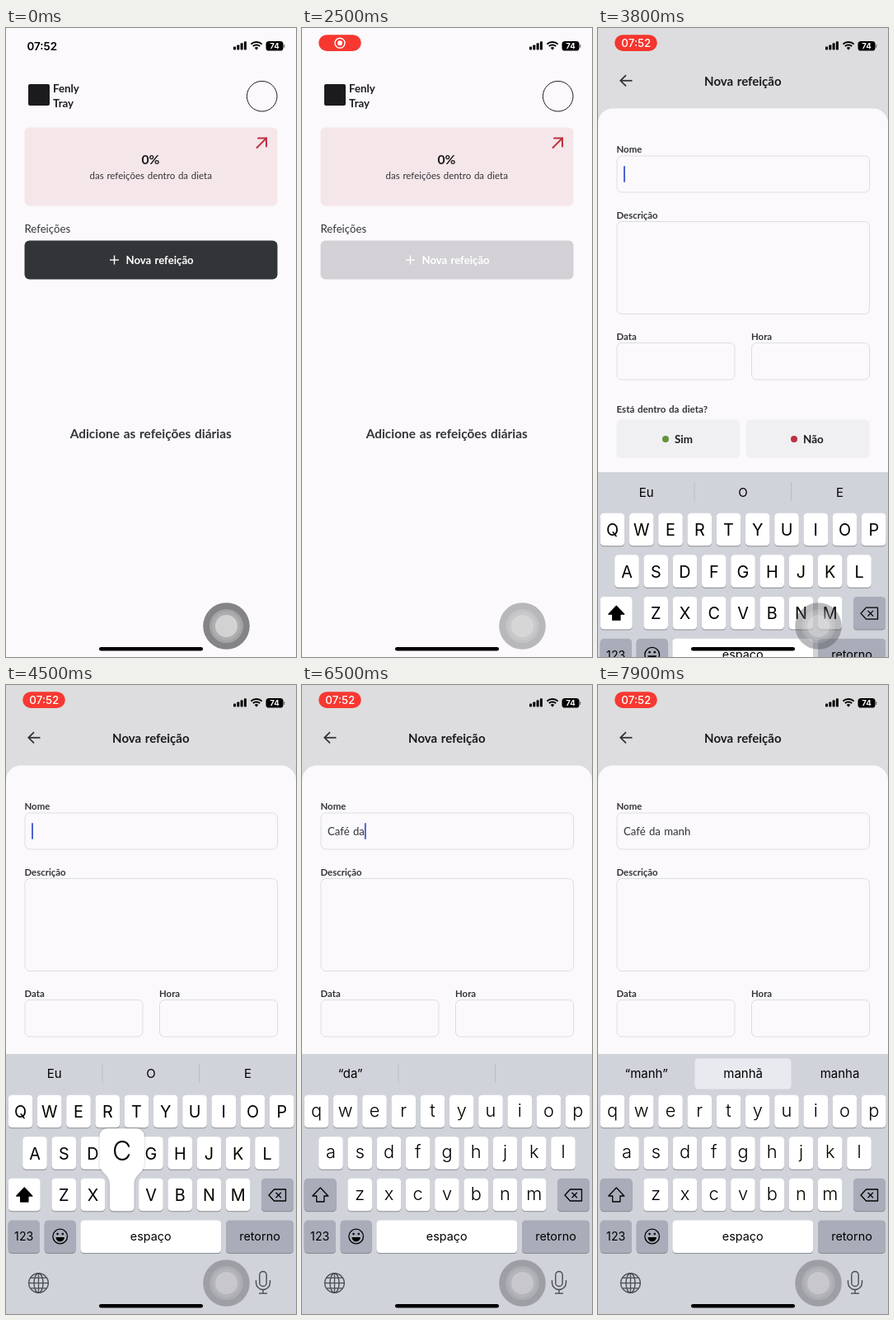
Animation of 352 by 762 pixels, one loop 8 s. Source, as an HTML page with a canvas:

```html
<!DOCTYPE html>
<html lang="pt">
<head>
<meta charset="utf-8">
<title>Nova refeição</title>
<style>
html, body { margin: 0; width: 100%; height: 100%; overflow: hidden; background: #fbf9fc; }
canvas { display: block; width: 352px; height: 762px; }
</style>
</head>
<body>
<canvas id="stage"></canvas>
<script>
const W = 352, H = 762, LOOP = 8000;
const canvas = document.getElementById('stage');
const ctx = canvas.getContext('2d');
const ratio = window.devicePixelRatio || 1;
canvas.width = W * ratio;
canvas.height = H * ratio;

const APP = 'Lato, sans-serif', SYS = 'Inter, sans-serif';
const PAPER = '#fbf9fc', INK = '#1b1b1e', DARK = '#333438', LINE = '#dddddf';
const RED = '#bf3040', GREEN = '#639339', SPECIAL = '#a9adb9';

const clamp = v => Math.max(0, Math.min(1, v));
const ramp = (t, a, b) => clamp((t - a) / (b - a));
// Remaining distance of a critically damped spring, from 1 to 0.
const spring = (t, start, w) => {
  const x = Math.max(0, t - start) / 1000 * w;
  const left = (1 + x) * Math.exp(-x);
  return left > 0.003 ? left : 0;
};

function box(x, y, w, h, r, fill, stroke) {
  ctx.beginPath();
  ctx.roundRect(x, y, w, h, r);
  if (fill) { ctx.fillStyle = fill; ctx.fill(); }
  if (stroke) { ctx.strokeStyle = stroke; ctx.lineWidth = 1; ctx.stroke(); }
}

function disc(x, y, r, fill) {
  ctx.beginPath();
  ctx.arc(x, y, r, 0, Math.PI * 2);
  ctx.fillStyle = fill;
  ctx.fill();
}

function ring(x, y, r, color, width) {
  ctx.beginPath();
  ctx.arc(x, y, r, 0, Math.PI * 2);
  ctx.strokeStyle = color;
  ctx.lineWidth = width;
  ctx.stroke();
}

function poly(points, x = 0, y = 0) {
  ctx.beginPath();
  points.forEach(([px, py]) => ctx.lineTo(x + px, y + py));
}

function lines(color, width, ...paths) {
  ctx.strokeStyle = color;
  ctx.lineWidth = width;
  for (const p of paths) { poly(p); ctx.stroke(); }
}

// y is the middle of the capital letters.
function text(s, x, y, size, { weight = 400, color = INK, align = 'left', font = APP } = {}) {
  ctx.font = `${weight} ${size}px ${font}`;
  ctx.wordSpacing = font === APP ? size * 0.07 + 'px' : '0px';
  ctx.textAlign = align;
  ctx.fillStyle = color;
  ctx.fillText(s, x, y + size * 0.36);
}
const mid = (s, x, y, size, opt) => text(s, x, y, size, { align: 'center', ...opt });
const sys = (s, x, y, size, opt) => mid(s, x, y, size, { font: SYS, color: '#000', ...opt });

/* ---------- typing ---------- */

// time, text in the field, suggestions, pressed key, highlighted suggestion
const STEPS = [
  [3600, '', ['Eu', 'O', 'E']],
  [4600, 'C', ['“C”', 'Com', 'Como'], 'c'],
  [4950, 'Ca', ['“Ca”', 'Cada', 'Casa'], 'a'],
  [5350, 'Caf', ['“Caf”', 'Café', 'Cafés'], 'f'],
  [5650, 'Cafe', ['“Cafe”', 'Café', 'Cafés'], 'e', 1],
  [5950, 'Café ', ['da', 'com', 'de'], ' '],
  [6250, 'Café d', ['“d”', 'de', 'da'], 'd'],
  [6450, 'Café da', ['“da”', '', ''], 'a'],
  [6750, 'Café da ', ['manhã', 'noite', 'tarde'], ' '],
  [7000, 'Café da m', ['“m”', 'me', 'meu'], 'm'],
  [7150, 'Café da ma', ['“ma”', 'mas', 'mais'], 'a'],
  [7300, 'Café da man', ['“man”', 'manhã', 'mandar'], 'n'],
  [7400, 'Café da manh', ['“manh”', 'manhã', 'manha'], 'h', 1]
];

function typing(t) {
  let i = 0;
  while (i + 1 < STEPS.length && t >= STEPS[i + 1][0]) i++;
  const [at, value, words, , best] = STEPS[i];
  const next = STEPS[i + 1];
  const hold = i === 0 ? 200 : 110;
  return {
    value, words, best, upper: i === 0,
    pressed: next && t >= next[0] - hold ? next[3] : null,
    cursor: t >= 3600 && (t - at) % 850 < 500
  };
}

/* ---------- screens ---------- */

function home(t) {
  ctx.fillStyle = PAPER;
  ctx.fillRect(0, 0, W, H);

  box(27, 68, 26, 26, 2, INK);
  text('Fenly', 57, 73, 13.3, { weight: 700 });
  text('Tray', 57, 91, 13.3, { weight: 700 });
  ring(310.7, 82.7, 18.3, INK, 1);

  box(22.5, 120.5, 307, 95, 6, '#f5e6e9');
  ctx.lineCap = 'round';
  lines(RED, 2, [[304.5, 145], [316, 133.5]], [[306, 133.5], [316, 133.5], [316, 143.5]]);
  ctx.lineCap = 'butt';
  mid('0%', 175.5, 159.4, 15.8, { weight: 700 });
  mid('das refeições dentro da dieta', 175.7, 178.5, 11.5, { color: DARK });

  text('Refeições', 22.5, 243.5, 13.2, { color: DARK });
  const press = ramp(t, 2330, 2500) * (1 - ramp(t, 2750, 2950));
  ctx.globalAlpha = 1 - 0.8 * press;
  box(22.5, 257.5, 307, 47, 6, DARK);
  ctx.globalAlpha = 1;
  lines('#fff', 1.4, [[126, 281], [137, 281]], [[131.5, 275.5], [131.5, 286.5]]);
  text('Nova refeição', 145.5, 281, 13.2, { weight: 700, color: '#fff' });

  mid('Adicione as refeições diárias', 175.7, 491.2, 15.4, { weight: 700, color: DARK });
}

function field(label, x, y, w, h) {
  text(label, x - 0.5, y - 8, 11.4, { weight: 700, color: DARK });
  box(x, y, w, h, 6, null, LINE);
}

function option(label, x, dot, color) {
  box(x, 474.5, 150, 46.5, 6, '#f0eff2');
  disc(dot, 498, 4, color);
  text(label, dot + 11, 498, 13.4, { weight: 700 });
}

function form(state) {
  ctx.fillStyle = LINE;
  ctx.fillRect(0, 0, W, 140);
  box(0, 97.5, W, H - 97.5, [18, 18, 0, 0], PAPER);
  lines(DARK, 1.8, [[41.5, 63.8], [27.5, 63.8]], [[34, 57.2], [27.3, 63.8], [34, 70.4]]);
  mid('Nova refeição', 175.8, 64.5, 15, { weight: 700 });

  field('Nome', 23, 155, 306.5, 44);
  field('Descrição', 23, 234.5, 306.5, 112);
  field('Data', 23, 381.5, 143, 44.5);
  field('Hora', 186.5, 381.5, 143, 44.5);

  text(state.value, 31, 177, 13.2, { color: DARK });
  if (state.cursor) {
    const end = 31 + ctx.measureText(state.value).width;
    box(end, 167, 2, 20, 1, '#5064d0');
  }

  text('Está dentro da dieta?', 22.5, 462, 11.6, { weight: 700, color: DARK });
  option('Sim', 22.5, 82, GREEN);
  option('Não', 179.5, 238, RED);

  box(22.5, 673.5, 307, 47, 6, DARK);
  mid('Cadastrar refeição', 178.5, 697, 13.4, { weight: 700, color: '#fff' });
}

/* ---------- keyboard ---------- */

const ROWS = [['qwertyuiop', 2.7, 496.7], ['asdfghjkl', 20.2, 547.2], ['zxcvbnm', 55.4, 597.8]];
const PITCH = 35.25, KEY_W = 29.6, KEY_H = 39.5;

function key(x, y, w, fill = '#fff') {
  box(x, y + 1, w, KEY_H, 4.5, '#898b91');
  box(x, y, w, KEY_H, 4.5, fill);
}

function bubble(x, y, letter) {
  const l = x - 12.3, r = x + KEY_W + 12.3, top = y - 60.5, right = x + KEY_W, foot = y + KEY_H;
  ctx.save();
  ctx.shadowColor = 'rgba(0,0,0,.25)';
  ctx.shadowBlur = 3 * ratio;
  ctx.beginPath();
  ctx.moveTo(l + 9, top);
  ctx.arcTo(r, top, r, y, 9);
  ctx.lineTo(r, y - 18);
  ctx.bezierCurveTo(r, y - 6, right, y - 6, right, y + 8);
  ctx.arcTo(right, foot, x, foot, 4.5);
  ctx.arcTo(x, foot, x, y, 4.5);
  ctx.lineTo(x, y + 8);
  ctx.bezierCurveTo(x, y - 6, l, y - 6, l, y - 18);
  ctx.arcTo(l, top, r, top, 9);
  ctx.fillStyle = '#fff';
  ctx.fill();
  ctx.restore();
  sys(letter, x + KEY_W / 2, y - 33.5, 32, { weight: 300 });
}

function shiftKey(upper) {
  key(2.7, 597.8, 39, upper ? '#fff' : SPECIAL);
  poly([[0, -9], [9.5, 1], [4.6, 1], [4.6, 8], [-4.6, 8], [-4.6, 1], [-9.5, 1]], 22.3, 618);
  ctx.closePath();
  ctx.lineJoin = 'round';
  ctx.lineWidth = 1.3;
  ctx.strokeStyle = ctx.fillStyle = '#000';
  if (upper) ctx.fill();
  ctx.stroke();
}

function deleteKey() {
  key(310, 597.8, 39, SPECIAL);
  poly([[319, 618], [325.5, 611], [339.5, 611], [339.5, 625], [325.5, 625]]);
  ctx.closePath();
  ctx.strokeStyle = '#000';
  ctx.lineWidth = 1.3;
  ctx.stroke();
  lines('#000', 1.3, [[327.5, 614.7], [334, 621.3]], [[334, 614.7], [327.5, 621.3]]);
}

function emojiKey() {
  key(46.7, 648.5, 38, SPECIAL);
  ring(65.7, 668, 8.8, '#000', 1.3);
  disc(62.6, 665, 1.3, '#000');
  disc(68.8, 665, 1.3, '#000');
  ctx.beginPath();
  ctx.arc(65.7, 669, 5.2, 0, Math.PI);
  ctx.closePath();
  ctx.fill();
}

function globe(x, y) {
  const c = '#4b4e55';
  ring(x, y, 11.8, c, 1.4);
  ctx.beginPath();
  ctx.ellipse(x, y, 5.5, 11.8, 0, 0, Math.PI * 2);
  ctx.stroke();
  lines(c, 1.3, [[x, y - 11.8], [x, y + 11.8]], [[x - 11.8, y], [x + 11.8, y]],
    [[x - 9.8, y - 6.3], [x + 9.8, y - 6.3]], [[x - 9.8, y + 6.3], [x + 9.8, y + 6.3]]);
}

function mic(x, y) {
  const c = '#4b4e55';
  ctx.lineWidth = 1.4;
  ctx.strokeStyle = c;
  ctx.beginPath();
  ctx.roundRect(x - 4.2, y - 13.5, 8.4, 18, 4.2);
  ctx.stroke();
  ctx.beginPath();
  ctx.arc(x, y, 8.5, 0, Math.PI);
  ctx.stroke();
  lines(c, 1.4, [[x, y + 8.5], [x, y + 13]], [[x - 5, y + 13], [x + 5, y + 13]],
    [[x - 8.5, y - 3], [x - 8.5, y]], [[x + 8.5, y - 3], [x + 8.5, y]]);
}

function keyboard(state) {
  ctx.fillStyle = '#d1d3da';
  ctx.fillRect(0, 447, W, 330);

  if (state.best) box(117.5, 452.5, 117, 37, 4.5, '#e9eaef');
  else lines('#bbbec6', 1, [[117, 459], [117, 482]], [[234.5, 459], [234.5, 482]]);
  state.words.forEach((word, i) => sys(word, 58.7 + i * 117.4, 471, 15));

  let popup = null;
  for (const [letters, x0, y] of ROWS) {
    [...letters].forEach((ch, i) => {
      const x = x0 + i * PITCH, label = state.upper ? ch.toUpperCase() : ch;
      key(x, y, KEY_W);
      if (ch === state.pressed) popup = [x, y, label];
      else if (state.upper) sys(label, x + KEY_W / 2, y + 20.3, 19.8);
      else sys(label, x + KEY_W / 2, y + 18.2, 21.8, { weight: 300 });
    });
  }

  shiftKey(state.upper);
  deleteKey();
  key(2.7, 648.5, 38.3, SPECIAL);
  sys('123', 21.7, 668.3, 14.2);
  emojiKey();
  key(90.3, 648.5, 171, state.pressed === ' ' ? SPECIAL : '#fff');
  sys('espaço', 175.7, 667.5, 14.4);
  key(267, 648.5, 82, SPECIAL);
  sys('retorno', 308, 667.5, 14.4);
  globe(39.5, 724.5);
  mic(312, 724);
  if (popup) bubble(...popup);
}

/* ---------- system overlay ---------- */

function recordPill(t) {
  const show = ramp(t, 50, 400);
  ctx.globalAlpha = 1 - ramp(t, 50, 350);
  sys('07:52', 43.8, 21.8, 13.4, { weight: 600 });

  const glow = 0.5 + 0.5 * Math.cos((Math.max(t, 2400) - 4200) / 1000 * Math.PI);
  ctx.globalAlpha = show;
  box(20.2, 8.2, 51.6, 19.8, 9.9, `rgb(${222 + 32 * glow},${46 + 12 * glow},${39 + 11 * glow})`);

  const clock = ramp(t, 3080, 3320);
  ctx.globalAlpha = show * (1 - clock);
  ring(46, 18.3, 6, '#fff', 1.4);
  disc(46, 18.3, 3, '#fff');
  ctx.globalAlpha = clock;
  sys('07:52', 46.3, 18.3, 13.4, { weight: 500, color: '#fff' });
  ctx.globalAlpha = 1;
}

function statusIcons() {
  for (let i = 0; i < 4; i++) {
    const h = 4 + i * 2.1;
    box(276 + i * 4.3, 26.5 - h, 3, h, 0.9, '#000');
  }
  ctx.strokeStyle = '#000';
  ctx.lineWidth = 2;
  for (const r of [9.4, 5.9]) {
    ctx.beginPath();
    ctx.arc(304, 26.3, r, -Math.PI * 0.75, -Math.PI * 0.25);
    ctx.stroke();
  }
  ctx.beginPath();
  ctx.moveTo(304, 26.8);
  ctx.arc(304, 26.3, 3.2, -Math.PI * 0.75, -Math.PI * 0.25);
  ctx.fillStyle = '#000';
  ctx.fill();
  box(315.5, 16, 21, 11.5, 3.6, '#000');
  box(337, 19.9, 1.3, 4, 0.7, '#777');
  sys('74', 326, 21.8, 9.6, { weight: 700, color: '#fff' });
}

function touchButton(t) {
  const rest = ramp(t, 50, 500), x = 267.5, y = 724.5;
  disc(x, y, 28.3, `rgba(70,70,73,${0.65 - 0.28 * rest})`);
  disc(x, y, 20.5, `rgba(255,255,255,${0.25 - 0.1 * rest})`);
  disc(x, y, 17.3, `rgba(255,255,255,${0.12 - 0.02 * rest})`);
  disc(x, y, 13.6, `rgba(255,255,255,${0.45 - 0.2 * rest})`);
}

function draw(t) {
  ctx.setTransform(ratio, 0, 0, ratio, 0, 0);
  const state = typing(t);
  const away = spring(t, 2650, 16);

  if (away) {
    ctx.save();
    ctx.translate(-0.3 * W * (1 - away), 0);
    home(t);
    ctx.restore();
    ctx.fillStyle = `rgba(0,0,0,${0.1 * (1 - away)})`;
    ctx.fillRect(0, 0, W, H);
  }
  if (t >= 2650) {
    ctx.save();
    ctx.translate(W * away, 0);
    form(state);
    ctx.restore();
  }
  if (t >= 3550) {
    ctx.save();
    ctx.translate(0, 315 * spring(t, 3552, 10));
    keyboard(state);
    ctx.restore();
  }
  recordPill(t);
  statusIcons();
  touchButton(t);
  box(113, 750, 126, 4.5, 2.25, '#000');
}

function loop() {
  draw(performance.now() % LOOP);
  requestAnimationFrame(loop);
}
loop();
</script>
</body>
</html>
```
